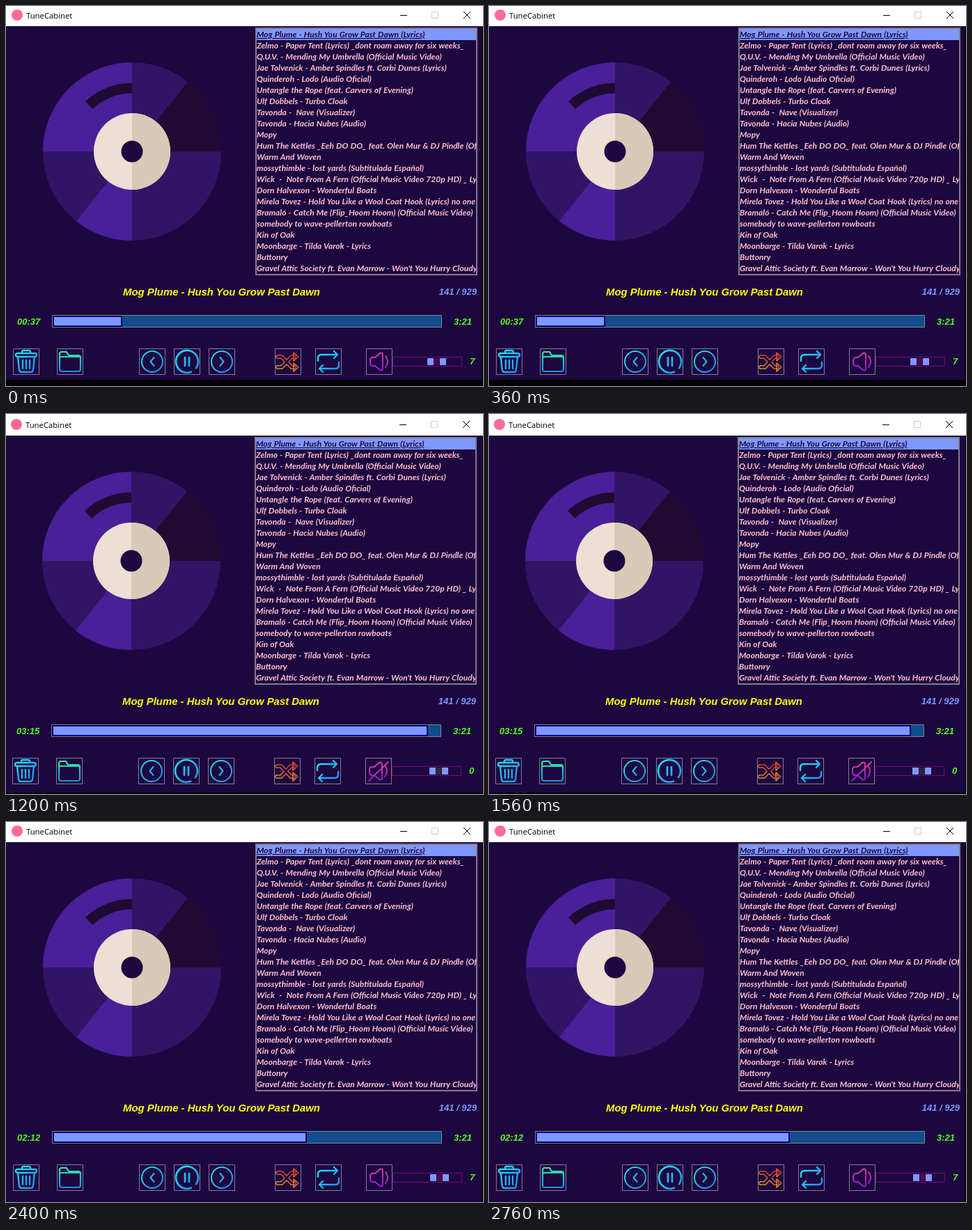
Write an HTML page that moves like this. It is 685 px wide and 546 px high and loops after 3 s.

```html
<!DOCTYPE html>
<html lang="en">
<head>
<meta charset="utf-8">
<title>TuneCabinet</title>
<style>
html, body { margin: 0; width: 100%; height: 100%; overflow: hidden; background: #000; }
svg { display: block; }
text { white-space: pre; }
.label { font: italic bold 13px "Liberation Sans", Arial, sans-serif; fill: #5f1; }
.song { font: italic bold 14.9px "Liberation Sans", Arial, sans-serif; fill: #ff0; }
.row { font: italic bold 12px Lato, sans-serif; word-spacing: .5px; fill: #ffc0cb; }
.picked { fill: #1d0740; text-decoration: underline; }
.icon { fill: none; stroke-linecap: round; stroke-linejoin: round; }
.frame { fill: #1d0740; stroke: #857c93; }
</style>
</head>
<body>
<svg width="685" height="546">
  <defs>
    <linearGradient id="aqua" x2="1" y2="1"><stop stop-color="#22e6f4"/><stop offset="1" stop-color="#1f8df0"/></linearGradient>
    <linearGradient id="mint" x2="0" y2="1"><stop stop-color="#2df0a0"/><stop offset="1" stop-color="#1a90ee"/></linearGradient>
    <linearGradient id="fire" y1="1" x2="1" y2="0"><stop stop-color="#ffb020"/><stop offset="1" stop-color="#f02a30"/></linearGradient>
    <linearGradient id="rose" x2="0" y2="1"><stop stop-color="#e23c9c"/><stop offset="1" stop-color="#9018d8"/></linearGradient>
    <clipPath id="listClip"><path d="M359 33H676V386H359z"/></clipPath>
  </defs>
  <rect id="body" fill="#1d0740"/>
  <g id="app">
    <path fill="#fff" d="M-5-5H690V29H-5z"/>
    <circle cx="16" cy="13" r="8" fill="#fb6b95"/>
    <text x="29" y="18" font-family="Open Sans, sans-serif" font-size="11.3">TuneCabinet</text>
    <path d="M566 13.5h10M657 8l10 10m0-10l-10 10" stroke="#000"/>
    <path d="M611.5 8.5h9v9h-9z" fill="none" stroke="#ccc"/>

    <g transform="translate(181 209)">
      <circle r="128" fill="#301565"/>
      <path d="M0 0H-128A128 128 0 0 1 0-128zM0 0V128A128 128 0 0 1-80 100z" fill="#4a1f99"/>
      <path d="M0 0L80-100A128 128 0 0 1 128 0z" fill="#1f0a31"/>
      <path d="M-62-66.5A91 91 0 0 1 0-91" fill="none" stroke="#1f0a31" stroke-width="15"/>
      <circle r="55" fill="#ecdfd4"/>
      <path d="M0-55A55 55 0 0 1 0 55z" fill="#d8c9b8"/>
      <circle r="15.5" fill="#1d0740"/>
    </g>

    <g id="list" clip-path="url(#listClip)"><path d="M360 33H676V49H360z" fill="#7f98ff"/></g>
    <path d="M359 32H676V386H359z" fill="none" stroke="#827c88" stroke-width="2"/>

    <text class="song" x="309.5" y="416" text-anchor="middle">Mog Plume - Hush You Grow Past Dawn</text>
    <text class="label" x="676" y="415" text-anchor="end" style="fill:#7f98ff">141 / 929</text>
    <text class="label" x="16" y="458" id="clock"></text>
    <text class="label" x="643" y="458">3:21</text>
    <path d="M66.5 444.5h559v17h-559z" fill="#104e8b" stroke="#7d8791"/>
    <rect id="barEdge" x="67" y="445" height="16"/>
    <rect id="bar" x="68.5" y="446.5" height="13" fill="#7f98ff" stroke="#00f"/>

    <g id="buttons"></g>

    <path d="M555.5 504.5h99v13h-99z" fill="#1d0740" stroke="#800080"/>
    <g id="thumb">
      <path d="M0 505h28v12H0z" fill="#12042a"/>
      <path d="M1 506h9v10H1zM19 506h9v10h-9z" fill="#7f98ff"/>
      <path id="grip" d="M11.5 506v10m2-10v10m2-10v10m2-10v10"/>
    </g>
    <text class="label" x="666" y="515" id="level"></text>
  </g>
</svg>
<script>
const $ = id => document.getElementById(id);
const add = (id, markup) => $(id).insertAdjacentHTML('beforeend', markup);

const songs = `Mog Plume - Hush You Grow Past Dawn (Lyrics)
Zelmo - Paper Tent (Lyrics) _dont roam away for six weeks_
Q.U.V. - Mending My Umbrella (Official Music Video)
Jae Tolvenick - Amber Spindles ft. Corbi Dunes (Lyrics)
Quinderoh - Lodo (Audio Oficial)
Untangle the Rope (feat. Carvers of Evening)
Ulf Dobbels - Turbo Cloak
Tavonda -  Nave (Visualizer)
Tavonda - Hacia Nubes (Audio)
Mopy
Hum The Kettles _Eeh DO DO_ feat. Olen Mur & DJ Pindle (Official Video)
Warm And Woven
mossythimble - lost yards (Subtitulada Español)
Wick  -  Note From A Fern (Official Music Video 720p HD) _ Lyrics
Dorn Halvexon - Wonderful Boats
Mirela Tovez - Hold You Like a Wool Coat Hook (Lyrics) no one climbs
Bramaló - Catch Me (Flip_Hoom Hoom) (Official Music Video)
somebody to wave-pellerton rowboats
Kin of Oak
Moonbarge - Tilda Varok - Lyrics
Buttonry
Gravel Attic Society ft. Evan Marrow - Won't You Hurry Cloudy`.split('\n');

songs.forEach((song, i) => {
  const y = 45 + 16 * i;
  const tick = i ? `<path d="M359.5 ${y - 10}v4" stroke="#ffc0cb"/>` : '';
  add('list', `${tick}<text class="row${i ? '' : ' picked'}" x="360" y="${y}">${song.replace('&', '&amp;')}</text>`);
});

const stroke = (d, paint, width = 2, extra = '') =>
  `<path class="icon" d="${d}" stroke="${paint}" stroke-width="${width}" ${extra}/>`;
const aqua = 'url(#aqua)', mint = 'url(#mint)', fire = 'url(#fire)', rose = 'url(#rose)';
const ring = 'M19 4a15 15 0 0 1 0 30a15 15 0 0 1 0-30';
const cross = 'M4 12h6L24 27h4M4 27h6L24 12h4';
const speaker = 'M6 17q0-4 4-4h3l7-6q4-2 4 3v18q0 5-4 3l-7-6h-3q-4 0-4-4zM28 11q6 8 0 16';

const icons = [
  [10, stroke('M7 7h24q3 0 3 2.5T31 12H7q-3 0-3-2.5T7 7M13 7V5q0-2 2-2h8q2 0 2 2v2M7 12l2 19q.5 3 3 3h14q2.5 0 3-3l2-19M14 17v12M19 17v12M24 17v12', aqua, 2.3)],
  [73, stroke('M4 14V8q0-3 3-3h7l3 5h14q3 0 3 3v17q0 3-3 3H7q-3 0-3-3V14q0-2 3-2h27', mint, 2.2)],
  [191, stroke(ring + 'M21.5 13l-5 6 5 6', aqua)],
  [241, stroke('M25 33.7a16 16 0 1 1 7-5.5M16 13v12M22 13v12', aqua, 2.7)],
  [291, stroke(ring + 'M16.5 13l5 6-5 6', aqua)],
  [386, stroke(cross, fire, 5.5) + stroke(cross, '#1d0740', 3.2) +
        stroke('M27 6l7 6-7 6zM27 21l7 6-7 6z', fire, 1.2)],
  [444, stroke('M4 18v-4q0-5 5-5h23M27 4l5 5-5 5M34 20v4q0 5-5 5H6M11 24l-5 5 5 5', aqua, 2.4)],
  [517, stroke(speaker, rose) + stroke('M5 33L33 6', rose, 2, 'id="slash"')],
];
icons.forEach(([x, art]) => add('buttons',
  `<g transform="translate(${x} 492)"><path class="frame" d="M.5.5h37v37H.5z"/>${art}</g>`));
const speakerFrame = $('buttons').lastChild.firstChild;

// Each pose: window shift, right and bottom edges, seconds played, muted, speaker lit, thumb position
const poses = [
  { dx: 0, dy: 0, right: 683, bottom: 537, sec: 37, thumb: 605 },
  { dx: -2, dy: -1, right: 683, bottom: 544, sec: 168, lit: true, thumb: 609 },
  { dx: -1, dy: 2, right: 684, bottom: 544, sec: 195, muted: true, thumb: 609 },
  { dx: 1, dy: -1, right: 684, bottom: 543, sec: 94, muted: true, lit: true, thumb: 609 },
  { dx: 0, dy: 0, right: 683, bottom: 546, sec: 132, thumb: 609 },
];
const two = n => String(n).padStart(2, '0');

function show({ dx, dy, right, bottom, sec, muted, lit, thumb }) {
  const played = Math.round(560 * sec / 201);
  $('app').setAttribute('transform', `translate(${dx} ${dy})`);
  $('body').setAttribute('width', right);
  $('body').setAttribute('height', bottom);
  $('clock').textContent = two(Math.floor(sec / 60)) + ':' + two(sec % 60);
  $('barEdge').setAttribute('width', played - 3);
  $('bar').setAttribute('width', played - 6);
  $('thumb').setAttribute('transform', `translate(${thumb - 1} 0)`);
  $('grip').setAttribute('stroke', muted ? '#4b4658' : '#80107c');
  $('level').textContent = muted ? 0 : 7;
  $('slash').style.display = muted ? '' : 'none';
  speakerFrame.style.fill = lit ? '#f0f0f0' : '';
}

function tick(now) {
  show(poses[Math.floor(now % 3000 / 600)]);
  requestAnimationFrame(tick);
}
tick(performance.now());
</script>
</body>
</html>
```
